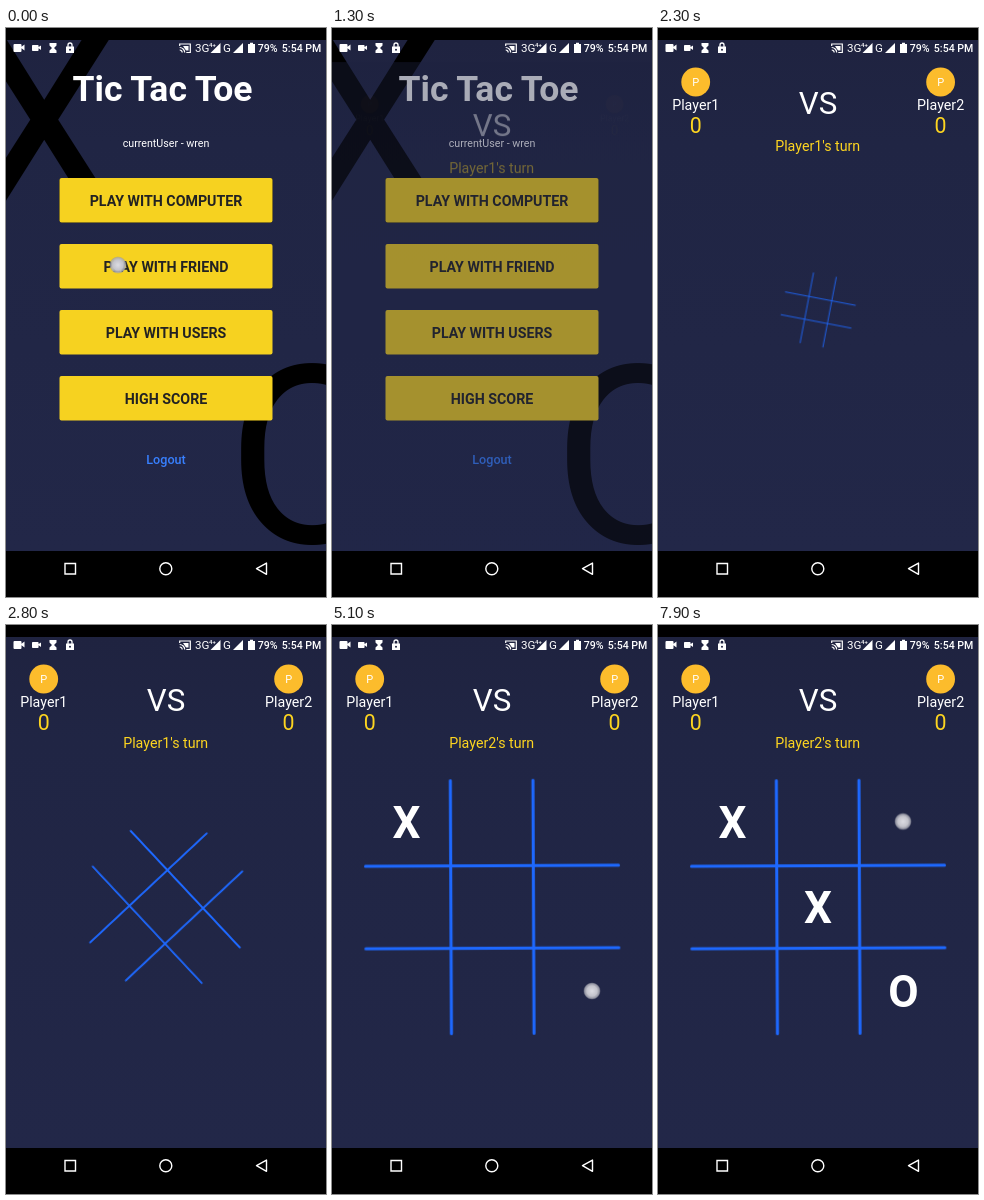
Animation, 320 px wide and 569 px high, one loop 8000 ms. Source, as an HTML page:

```html
<!DOCTYPE html>
<html lang="en">
<head>
<meta charset="utf-8">
<title>Tic Tac Toe</title>
<style>
html, body { margin: 0; width: 100%; height: 100%; overflow: hidden; background: #000; }
svg { display: block; width: 100vw; height: 100vh; font-family: Roboto, sans-serif; }
text { fill: #fff; text-anchor: middle; }
.title { font-size: 35.55px; font-weight: 700; }
.user { font-size: 10.67px; }
.ghost { font-size: 248px; fill: #000; }
.btn rect { fill: #f6d220; }
.btn text { font-size: 14.22px; font-weight: 700; fill: #222; }
.link { font-size: 12.6px; font-weight: 500; fill: #3880ff; }
.vs { font-size: 31.3px; }
.name, .turn { font-size: 14.22px; }
.initial { font-size: 11px; }
.score { font-size: 21.3px; }
.score, .turn { fill: #fdd520; }
.mark { font-size: 44px; font-weight: 700; }
.grid { stroke: #1d68ff; stroke-width: 3; stroke-linecap: round; }
.status text { font-size: 10.6px; font-weight: 500; text-anchor: start; }

.page, .player, .board { animation: 8s linear infinite; }
.page { animation-name: enter; }
.player { animation-name: pop; }
.board { animation-name: spin; }
.touch, .turn, .mark { animation: 8s step-end infinite; }
.touch { animation-name: tap; }
.first { animation-name: first; }
.second { animation-name: second; }
.m1 { animation-name: m1; }
.m2 { animation-name: m2; }
.m3 { animation-name: m3; }

@keyframes enter {
  0%, 13.9% { opacity: 0; transform: translateY(35.5px); }
  20.15%, 100% { opacity: 1; transform: translateY(0); }
}
@keyframes pop {
  0%, 16% { opacity: 0; transform: scale(.6); }
  22%, 100% { opacity: 1; transform: scale(1); }
}
@keyframes spin {
  0%, 23.75% { transform: rotate(0deg) scale(0); }
  41.6%, 100% { transform: rotate(360deg) scale(1); }
}
@keyframes tap {
  0% { opacity: 1; transform: translate(112px, 237px); }
  1.2% { opacity: 0; transform: translate(112px, 237px); }
  46% { opacity: 1; transform: translate(74px, 196px); }
  50% { opacity: 0; transform: translate(74px, 196px); }
  61% { opacity: 1; transform: translate(260px, 366px); }
  65% { opacity: 0; transform: translate(260px, 366px); }
  77.5% { opacity: 1; transform: translate(160px, 282px); }
  80.5% { opacity: 0; transform: translate(160px, 282px); }
  96.5%, 100% { opacity: 1; transform: translate(245px, 196.5px); }
}
@keyframes first { 0%, 65% { opacity: 1; } 50%, 80.5%, 100% { opacity: 0; } }
@keyframes second { 0%, 65% { opacity: 0; } 50%, 80.5%, 100% { opacity: 1; } }
@keyframes m1 { 0% { opacity: 0; } 50%, 100% { opacity: 1; } }
@keyframes m2 { 0% { opacity: 0; } 65%, 100% { opacity: 1; } }
@keyframes m3 { 0% { opacity: 0; } 80.5%, 100% { opacity: 1; } }
</style>
</head>
<body>
<svg viewBox="0 0 320 569">
  <defs>
    <clipPath id="screen"><rect y="12" width="320" height="511"/></clipPath>
    <linearGradient id="sky" x2="0" y2="1">
      <stop stop-color="#1f2340"/>
      <stop offset=".2" stop-color="#202544"/>
      <stop offset="1" stop-color="#222748"/>
    </linearGradient>
    <radialGradient id="dot">
      <stop stop-color="#dcdce2"/>
      <stop offset=".6" stop-color="#c3c3cb"/>
      <stop offset=".85" stop-color="#a9aab4" stop-opacity=".85"/>
      <stop offset="1" stop-color="#8b8c9a" stop-opacity=".3"/>
    </radialGradient>
    <rect id="bg" y="12" width="320" height="511" fill="url(#sky)"/>
    <rect id="key" x="53.5" y="150" width="213" height="44.5" rx="2"/>
    <path id="camera" d="M0 1q0-1 1-1h6q1 0 1 1v1.8l3-2.3v6l-3-2.3V7q0 1-1 1H1q-1 0-1-1z"/>
    <path id="signal" d="M0 10L10 0v10z"/>
  </defs>

  <rect width="320" height="569"/>
  <g clip-path="url(#screen)">
    <use href="#bg"/>
    <text class="ghost" x="38" y="181">X</text>
    <text class="ghost" x="306" y="515">O</text>
    <text class="title" x="156.5" y="73">Tic Tac Toe</text>
    <text class="user" x="160" y="119">currentUser - wren</text>
    <g class="btn"><use href="#key"/><rect x="53.5" y="150" width="213" height="44.5" rx="2"/><text x="160" y="178">PLAY WITH COMPUTER</text></g>
    <g class="btn" transform="translate(0 66)"><rect x="53.5" y="150" width="213" height="44.5" rx="2"/><text x="160" y="178">PLAY WITH FRIEND</text></g>
    <g class="btn" transform="translate(0 132)"><rect x="53.5" y="150" width="213" height="44.5" rx="2"/><text x="160" y="178">PLAY WITH USERS</text></g>
    <g class="btn" transform="translate(0 198)"><rect x="53.5" y="150" width="213" height="44.5" rx="2"/><text x="160" y="178">HIGH SCORE</text></g>
    <text class="link" x="160" y="435.5">Logout</text>

    <g class="page">
      <use href="#bg"/>
      <text class="vs" x="160" y="86">VS</text>
      <text class="turn first" x="159.7" y="123">Player1's turn</text>
      <text class="turn second" x="159.7" y="123">Player2's turn</text>
      <g transform="translate(37.7 54)"><g class="player">
        <circle r="14.4" fill="#fcbc2c"/>
        <text class="initial" y="4">P</text>
        <text class="name" y="28">Player1</text>
        <text class="score" y="50.5">0</text>
      </g></g>
      <g transform="translate(282.6 54)"><g class="player">
        <circle r="14.4" fill="#fcbc2c"/>
        <text class="initial" y="4">P</text>
        <text class="name" y="28">Player2</text>
        <text class="score" y="50.5">0</text>
      </g></g>
      <g transform="translate(160.2 282)"><g class="board">
        <path class="grid" transform="rotate(-.25)" d="M-41.3-126.5v253M41.3-126.5v253M-126.5-41.3h253M-126.5 41.3h253"/>
      </g></g>
      <text class="mark m1" x="74.5" y="212.5">X</text>
      <text class="mark m2" x="245.5" y="382">O</text>
      <text class="mark m3" x="160" y="297.5">X</text>
    </g>
  </g>

  <g class="status" fill="#fff">
    <use href="#camera" x="7.5" y="16"/>
    <use href="#camera" transform="translate(26 17) scale(.82 .75)"/>
    <path d="M43.5 15h7v2.5L48 20l2.5 2.5V25h-7v-2.5L46 20l-2.5-2.5z"/>
    <path d="M60 18.5h8V25h-8z"/>
    <path d="M62 19v-2a2 2 0 0 1 4 0v2" fill="none" stroke="#fff" stroke-width="1.3"/>
    <circle cx="64" cy="21.7" r="1" fill="#1f2340"/>
    <path d="M173.7 18v-2h10.6v8.5h-4M173.7 19.5a5 5 0 0 1 5 5M173.7 22a2.5 2.5 0 0 1 2.5 2.5" fill="none" stroke="#fff" stroke-width="1.2"/>
    <path d="M177 18h5.5v4.5h-2.5z"/>
    <text x="189" y="24.3" style="font-size:11.6px;font-weight:400">3G</text>
    <text x="203" y="18.5" style="font-size:6px">4+</text>
    <use href="#signal" x="204.5" y="15"/>
    <text x="217" y="24.3" style="font-size:11.6px;font-weight:400">G</text>
    <use href="#signal" x="227" y="15"/>
    <path d="M242 16h2v-1.3h3V16h2v9h-7z"/>
    <text x="251.7" y="24">79%</text>
    <text x="275.8" y="24">5:54 PM</text>
  </g>

  <g fill="none" stroke="#fff" stroke-width="1.4">
    <path d="M59 535.5h10.5V546H59z"/>
    <circle cx="159.8" cy="540.7" r="6"/>
    <path d="M250.5 540.7l10-5.6v11.2z" stroke-linejoin="round"/>
  </g>

  <circle class="touch" r="8.6" fill="url(#dot)"/>
</svg>
</body>
</html>
```
